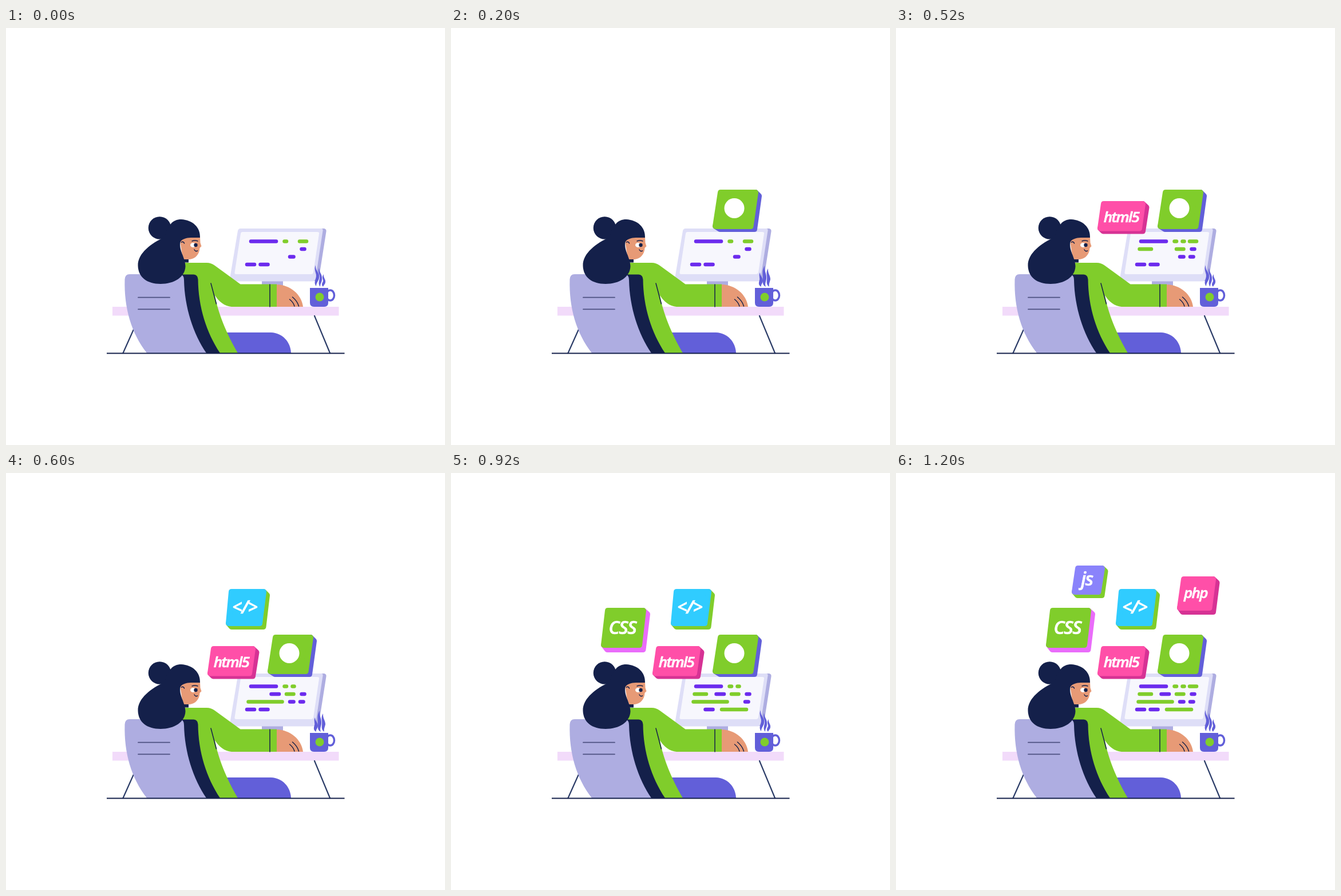
Recreate the animation shown at these times as an HTML page. Size 767 px wide and 730 px high, loop 1.4 s.

```html
<!DOCTYPE html>
<html lang="en">
<head>
<meta charset="utf-8">
<title>Coding at the desk</title>
<style>
  :root {
    --navy: #14204a;
    --green: #80cd2b;
    --violet: #625fd9;
    --purple: #6c2bee;
    --lilac: #aeade1;
    --pink: #ff4fa8;
    --rose: #d63294;
    --skin: #e79a76;
  }
  html, body { margin: 0; width: 100%; height: 100%; overflow: hidden; background: #fff; }
  svg { display: block; width: 100%; height: 100%; }

  .navy { fill: var(--navy); }
  .green { fill: var(--green); }
  .violet { fill: var(--violet); }
  .lilac { fill: var(--lilac); }
  .skin { fill: var(--skin); }
  .line { fill: none; stroke: var(--navy); stroke-width: 1.5; stroke-linecap: round; }
  .legs { stroke: #2c3d68; stroke-width: 2.2; }
  .seam { stroke: #4d5080; stroke-width: 1.8; }
  .floor { stroke-width: 2; stroke-linecap: butt; }

  .code path { fill: none; stroke: var(--purple); stroke-width: 6.5; stroke-linecap: round; }
  .code .g { stroke: var(--green); }
  .steam { fill: var(--violet); }

  .tile polygon { stroke-width: 10; stroke-linejoin: round; fill: var(--c); stroke: var(--c); }
  .tile text {
    font: italic 600 32px "Open Sans", "Noto Sans", sans-serif;
    letter-spacing: -1.4px; text-anchor: middle;
    fill: #fff; stroke: #fff; stroke-width: .7;
  }
  .tile .small { font-size: 26px; letter-spacing: -1.6px; }

  /* The loop has seven equal beats; every change is a hard cut. */
  [class*="on-"] { animation: 1400ms step-end infinite; }
  .on-1 { animation-name: from1; }
  .on-2 { animation-name: from2; }
  .on-3 { animation-name: from3; }
  .on-4 { animation-name: from4; }
  .on-5 { animation-name: from5; }
  .on-6 { animation-name: from6; }
  .on-ends { animation-name: ends; }
  .on-not4 { animation-name: not4; }
  .on-not5 { animation-name: not5; }
  .on-246 { animation-name: beats246; }
  .on-46 { animation-name: beats46; }
  .on-even { animation-name: even; }
  .on-odd { animation-name: odd; }

  @keyframes from1 { 0% { opacity: 0 } 14.2857%, 100% { opacity: 1 } }
  @keyframes from2 { 0% { opacity: 0 } 28.5714%, 100% { opacity: 1 } }
  @keyframes from3 { 0% { opacity: 0 } 42.8571%, 100% { opacity: 1 } }
  @keyframes from4 { 0% { opacity: 0 } 57.1428%, 100% { opacity: 1 } }
  @keyframes from5 { 0% { opacity: 0 } 71.4285%, 100% { opacity: 1 } }
  @keyframes from6 { 0% { opacity: 0 } 85.7142%, 100% { opacity: 1 } }
  @keyframes ends { 0%, 71.4285%, 100% { opacity: 1 } 42.8571% { opacity: 0 } }
  @keyframes not4 { 0%, 71.4285%, 100% { opacity: 1 } 57.1428% { opacity: 0 } }
  @keyframes not5 { 0%, 85.7142%, 100% { opacity: 1 } 71.4285% { opacity: 0 } }
  @keyframes beats246 {
    0%, 42.8571%, 71.4285% { opacity: 0 }
    28.5714%, 57.1428%, 85.7142%, 100% { opacity: 1 }
  }
  @keyframes beats46 { 0%, 71.4285% { opacity: 0 } 57.1428%, 85.7142%, 100% { opacity: 1 } }
  @keyframes even {
    0%, 28.5714%, 57.1428%, 85.7142%, 100% { opacity: 1 }
    14.2857%, 42.8571%, 71.4285% { opacity: 0 }
  }
  @keyframes odd {
    0%, 28.5714%, 57.1428%, 85.7142%, 100% { opacity: 0 }
    14.2857%, 42.8571%, 71.4285% { opacity: 1 }
  }
</style>
</head>
<body>
<svg viewBox="0 0 767 730" preserveAspectRatio="none">

  <!-- monitor -->
  <g>
    <rect class="lilac" x="447" y="442" width="37" height="9"/>
    <path class="lilac" d="M548 351H556Q560 352 559.500 356L547 436Q545 443 538 443Z"/>
    <path fill="#dedef7" d="M410 351H551Q554 351 553.500 355L541 438Q540 443.500 535 443.500H394Q390.500 443 391 439L405 355Q406 351 410 351Z"/>
    <path fill="#f7f7fd" d="M413 357H544Q547.500 357 547 360L537 428Q536 431 533 431H402Q399 431 399.500 428L410 360Q410.500 357 413 357Z"/>
  </g>

  <g class="code">
    <path d="M428 373.500H472"/>
    <path class="g on-not5" d="M486.500 373.500H490"/>
    <path class="g on-2" d="M500.500 373.500H503.500"/>
    <path class="g on-ends" d="M513 373.500H525"/>
    <path class="g on-246" d="M425.500 387H446"/>
    <path class="on-3" d="M463.500 387H477"/>
    <path class="g on-2" d="M490 387H502.500"/>
    <path d="M516.500 387H521.500"/>
    <path class="g on-3" d="M423.500 400.500H482.500"/>
    <path class="on-not4" d="M496 400.500H502.500"/>
    <path class="on-2" d="M514 400.500H519.500"/>
    <path class="on-not4" d="M421 414H434"/>
    <path d="M444.500 414H457.500"/>
    <path class="g on-46" d="M473 414H516"/>
  </g>

  <!-- desk -->
  <rect x="186" y="488" width="395.500" height="15.500" fill="#f2dbfa"/>
  <path class="line legs" d="M234 503L204.500 569M539 504L566 569"/>

  <!-- mug -->
  <ellipse cx="566.500" cy="468" rx="7" ry="9" fill="none" stroke="var(--violet)" stroke-width="3.500"/>
  <path class="violet" d="M531 455H563V481Q563 488 556 488H538Q531 488 531 481Z"/>
  <circle class="green" cx="548" cy="471" r="7.500"/>

  <g class="steam">
    <g class="on-even">
      <path d="M541 415C540 426 549 428 547 438C546 443 542 446 542 452C537 446 541 441 542 436C543 429 537 424 541 415Z"/>
      <path d="M547 420C547 428 553 431 552 440C552 445 549 447 549 453C545 448 547 443 548 438C549 431 544 428 547 420Z"/>
      <path d="M555 431C554 437 559 440 558 445C558 448 555 450 554 453C550 449 553 446 554 443C554 439 551 437 555 431Z"/>
    </g>
    <g class="on-odd">
      <path d="M540 428C540 434 545 437 545 442C545 447 541 449 542 453C536 450 538 445 539 441C540 437 537 433 540 428Z"/>
      <path d="M548 416C547 426 552 431 551 439C550 445 548 448 550 453C543 450 545 443 545 437C545 430 543 424 548 416Z"/>
      <path d="M554 421C553 429 558 433 558 440C557 445 555 448 556 453C550 449 552 443 552 438C552 432 550 427 554 421Z"/>
    </g>
  </g>

  <!-- person -->
  <path class="violet" d="M380 533H463C483 534 497 549 498 569H390Z"/>
  <path class="green" d="M306 411H351Q358 411 365 416L409.500 448.500H473V488H394C382 487 372 479 365 468C370 497 385 535 405 569H350L314 480L306 434Z"/>
  <path class="line" d="M358 447L367.500 483M461 449V488"/>
  <path class="skin" d="M473 449C497 450 516 466 519 488H473Z"/>
  <path class="line" d="M495.500 475Q502 480 504 487M500.500 471Q509 478 511.500 487"/>

  <!-- chair -->
  <path class="navy" d="M300 431.500H328Q335 432 335.500 440C336 488 350 533 374 569H330L300 500Z"/>
  <path class="lilac" d="M216 431H304Q311 432 311 441C312 489 327 535 350 569H246C219 534 206 490 207.500 440Q208 431 216 431Z"/>
  <path class="line seam" d="M231 471.700H286M231 492.300H286"/>

  <!-- head -->
  <path class="navy" d="M309 402H319V410.500H309Z"/>
  <path class="skin" d="M303 366H339L339.500 376L341.500 382L338.500 385C338 396 331 404 321 405L309 405Z"/>
  <circle class="navy" cx="268.500" cy="350" r="19.800"/>
  <path class="navy" d="M277 366C283 345 291 335 306 335C326 336 340 349 339 367H323C315 367 306 370 304.500 375C302 390 313 401 313.500 417C313 436 294 448 270 448C246 448 231 436 230.500 416C230 394 254 377 277 366Z"/>
  <ellipse cx="327" cy="380" rx="5" ry="4" fill="#fff"/>
  <circle class="navy" cx="331.500" cy="380" r="3.200"/>
  <path class="line" d="M325 373Q330 371 335 373M329 388Q331 392 334.500 390M306.500 375Q310 373 311.500 377"/>

  <path class="line floor" d="M176 569.500H591.500"/>

  <!-- tiles -->
  <g class="tile on-1">
    <polygon style="--c:var(--violet)" points="532,288 538,294 530,352 470,352 462,347"/>
    <polygon style="--c:var(--green)" points="471,288 532,288 523.500,347 462,347"/>
    <circle cx="495" cy="315.500" r="17.500" fill="#fff"/>
  </g>
  <g class="tile on-2">
    <polygon style="--c:var(--rose)" points="431,308 437.500,314 431,355.500 362,355.500 357,350.500"/>
    <polygon style="--c:var(--pink)" points="363,308 431,308 425,350.500 357,350.500"/>
    <text class="small" x="393.500" y="340">html5</text>
  </g>
  <g class="tile on-3">
    <polygon style="--c:var(--green)" points="450,208 456,214 449.500,269 394,269 389,263"/>
    <polygon style="--c:#30ccff" points="394,208 450,208 443,263 389,263"/>
    <text x="417" y="245.500">&lt;/&gt;</text>
  </g>
  <g class="tile on-4">
    <polygon style="--c:#ea6cfa" points="336,241 343,247 335.500,309 273,309 267,301"/>
    <polygon style="--c:var(--green)" points="274,241 336,241 329,301 267,301"/>
    <text x="299.500" y="282">CSS</text>
  </g>
  <g class="tile on-5">
    <polygon style="--c:var(--rose)" points="554,186 560.500,192 554,243 501,243 496,236"/>
    <polygon style="--c:var(--pink)" points="503,186 554,186 547.500,236 496,236"/>
    <text class="small" x="523.500" y="218.500">php</text>
  </g>
  <g class="tile on-6">
    <polygon style="--c:var(--green)" points="360,167 365.500,172 359.500,214 317,214 312,208"/>
    <polygon style="--c:#8a83fb" points="318,167 360,167 353.500,208 312,208"/>
    <text x="333.500" y="197">js</text>
  </g>
</svg>
</body>
</html>
```
